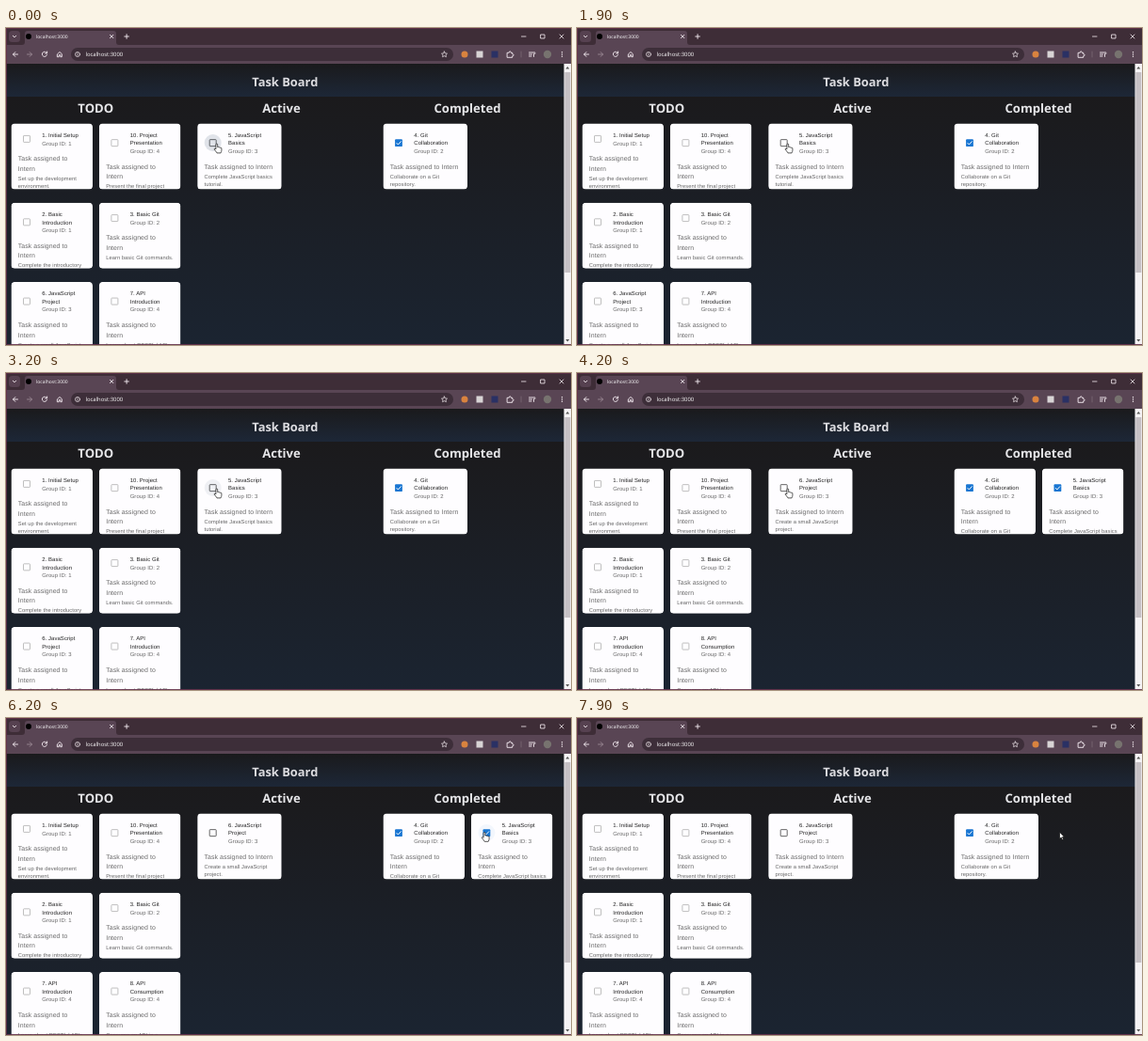
Write an HTML page that moves like this. It is 600 by 337 pixels and loops after 8000 ms.

```html
<!DOCTYPE html>
<html lang="en">
<head>
<meta charset="utf-8">
<title>Task Board</title>
<style>
  html, body { margin: 0; width: 100%; height: 100%; overflow: hidden; background: #1b1b1d; }
  svg { display: block; width: 600px; height: 337px; text-rendering: geometricPrecision; }
  .ui { font-family: "Open Sans", "Noto Sans", sans-serif; fill: #fff; }
  .head { font-family: "Open Sans", "Noto Sans", sans-serif; font-weight: 700; fill: #dcdce0; text-anchor: middle; }
  .card { font-family: "Liberation Sans", Arial, sans-serif; font-size: 5.95px; letter-spacing: .01em; }
  .title { fill: #222; }
  .group { fill: #666; }
  .task { fill: #6a6a6a; font-size: 6.95px; }
  .desc { fill: #666; font-size: 5.75px; letter-spacing: .01em; }
  .line { fill: none; stroke: #f6eef3; stroke-width: .9; stroke-linecap: round; stroke-linejoin: round; }
</style>
</head>
<body>
<svg viewBox="0 0 600 337">
  <defs>
    <linearGradient id="banner" x2="0" y2="1">
      <stop stop-color="#1a1a1c"/><stop offset="1" stop-color="#1d2737"/>
    </linearGradient>
    <linearGradient id="page" x2="0" y2="1">
      <stop stop-color="#1b1a1c"/><stop offset="1" stop-color="#1b2431"/>
    </linearGradient>
  </defs>

  <!-- browser window -->
  <rect width="600" height="19" fill="#3e2d37"/>
  <rect x="3" y="3" width="12" height="12" rx="3.5" fill="#564150"/>
  <path d="M17 18q3 0 3-3V6q0-3 3-3h91q3 0 3 3v9q0 3 3 3z" fill="#594554"/>
  <rect y="18" width="600" height="20" fill="#594554"/>
  <rect x="69" y="21" width="406" height="14" rx="7" fill="#3d2e39"/>
  <circle cx="24" cy="9" r="3" fill="#000"/>
  <g class="ui">
    <text x="32" y="11" font-size="5">localhost:3000</text>
    <text x="84.5" y="30.1" font-size="5.9">localhost:3000</text>
  </g>
  <g class="line">
    <path d="M7.3 8.2 9 9.9l1.7-1.7M110.5 7.3l3.4 3.4m0-3.4-3.4 3.4M125.8 9h4.6m-2.3-2.3v4.6"/>
    <path d="M547.5 9h4.5m16-2h4v4h-4zM588 7l4 4m0-4-4 4" stroke-width=".8"/>
    <path d="M12.5 28H7.5m2.3-2.4L7.5 28l2.3 2.4"/>
    <path d="M22.5 28h5m-2.3-2.4 2.3 2.4-2.3 2.4" stroke="#9a8894"/>
    <path d="M43.3 26.6a2.6 2.6 0 1 0 .2 2M43.6 25v2h-2"/>
    <path d="M54.7 27.6 57 25.5l2.3 2.1v3.1h-1.5v-2h-1.6v2h-1.5z"/>
    <circle cx="76" cy="28" r="2.5" stroke-width=".7"/><path d="M76 27.8v1.3m0-2.5v.1" stroke-width=".7"/>
    <path d="m465.5 25 .9 1.9 2.1.3-1.5 1.4.4 2.1-1.9-1-1.9 1 .4-2.1-1.5-1.4 2.1-.3z" stroke-width=".7"/>
    <path d="M532.5 26.3h1.7q0-1.5 1-1.5t1 1.5h1.5v1.5q1.4 0 1.4 1t-1.4 1v1.5h-5.2z"/>
    <path d="M547 25v6" stroke="#806d7a" stroke-width=".7"/>
    <path d="M555.5 26h6m-6 2h3m-3 2h2.5m2.5.4v-3l1.6-.4"/>
  </g>
  <circle cx="487" cy="28" r="3.5" fill="#d9833f"/>
  <rect x="499.5" y="24.5" width="7" height="7" fill="#d8d4d5"/>
  <rect x="515.5" y="24.5" width="7" height="7" fill="#2a3164"/>
  <circle cx="575" cy="28" r="4.2" fill="#77736f"/>
  <g fill="#f6eef3"><circle cx="590.5" cy="25.8" r=".7"/><circle cx="590.5" cy="28" r=".7"/><circle cx="590.5" cy="30.2" r=".7"/></g>

  <!-- page -->
  <rect y="38" width="593" height="35" fill="url(#banner)"/>
  <rect y="73" width="593" height="264" fill="url(#page)"/>
  <g class="head">
    <text x="296.3" y="61.6" font-size="12.9">Task Board</text>
    <g font-size="13.1" fill="#e6e6e9">
      <text x="95.3" y="89.5">TODO</text>
      <text x="292.5" y="89.5">Active</text>
      <text x="490" y="89.5">Completed</text>
    </g>
  </g>
  <g id="board" class="card"></g>
  <circle id="ripple" cy="122" r="9"/>

  <rect x="592.5" y="38" width="7.5" height="299" fill="#f5f3f5"/>
  <rect x="593.3" y="47" width="6" height="213" fill="#c6c1c5"/>
  <path d="M594.3 43.5l2-2.4 2 2.4zM594.3 331l2 2.4 2-2.4z" fill="#555"/>
  <path d="M.5 0V336.5H600M0 .4H600" fill="none" stroke="#65324b" stroke-width=".9"/>

  <g id="cursor" fill="#fff" stroke="#111" stroke-width=".7" stroke-linejoin="round">
    <path id="arrow" d="M0 0V7.2L1.7 5.7 2.8 8.3 4 7.8 2.9 5.3H5.1z"/>
    <path id="hand" d="M-.9.6Q-.9-.2 0-.2T.9.6V3.4Q1.8 2.8 2.4 3.6 3.3 3.1 3.9 4 5 3.7 5.1 4.8V7Q5 8.2 4.2 9.6H.2Q-.6 8-2.6 5.9-2.8 4.7-1.7 4.9L-.9 5.6z"/>
  </g>
</svg>

<script>
const LOOP = 8000, ADVANCE = 3450, REMOVE = 7450;
const $ = id => document.getElementById(id);

// id: [title lines, description lines]
const tasks = {
  1: ["1. Initial Setup", "Set up the development|environment."],
  2: ["2. Basic|Introduction", "Complete the introductory"],
  3: ["3. Basic Git", "Learn basic Git commands."],
  4: ["4. Git|Collaboration", "Collaborate on a Git|repository."],
  5: ["5. JavaScript|Basics", "Complete JavaScript basics|tutorial."],
  6: ["6. JavaScript|Project", "Create a small JavaScript|project."],
  7: ["7. API|Introduction", "Learn about RESTful APIs"],
  8: ["8. API|Consumption", "Consume an API in a"],
  10: ["10. Project|Presentation", "Present the final project"]
};
const groups = { 1: 1, 2: 1, 3: 2, 4: 2, 5: 3, 6: 3, 7: 4, 8: 4, 10: 4 };

function checkbox(x, y, kind) {
  if (kind == "done")
    return `<rect x="${x - 3.9}" y="${y - 3.9}" width="7.8" height="7.8" rx=".9" fill="#1976d2"/>
      <path d="M${x - 2.3} ${y}l1.7 1.8 3.2-3.5" fill="none" stroke="#fff" stroke-width="1"/>`;
  return `<rect x="${x - 3.5}" y="${y - 3.5}" width="7" height="7" rx=".6" fill="none"
    stroke="${kind == "active" ? "#555" : "#b8b8b8"}" stroke-width=".9"/>`;
}

function card(id, x, y, kind, wide) {
  const [title, desc] = tasks[id].map(s => s.split("|"));
  const extra = (title.length - 1) * 8.5, clip = `clip${id}`;
  const box = `<rect x="${x}" y="${y}" width="${wide ? 89.5 : 86.5}" height="70" rx="3.5" fill="#fefdff"/>`;
  const lines = (cls, list, dx, top, gap) => list.map((s, i) =>
    `<text class="${cls}" x="${x + dx}" y="${top + i * gap}">${s}</text>`).join("");
  const task = wide ? ["Task assigned to Intern"] : ["Task assigned to", "Intern"];
  const taskTop = y + 39.7 + extra, descTop = taskTop + task.length * 10.4 - .4;
  return `<clipPath id="${clip}">${box}</clipPath><g clip-path="url(#${clip})">${box}
    ${checkbox(x + 16.5, y + 16.4 + extra / 2, kind)}
    ${lines("title", title, 32.8, y + 14.3, 8.5)}
    ${lines("group", ["Group ID: " + groups[id]], 32.8, y + 23 + extra, 0)}
    ${lines("task", task, 7.3, taskTop, 10.4)}
    ${lines("desc", desc, 7.3, descTop, 8.3)}</g>`;
}

function column(ids, x, kind) {
  const wide = ids.length == 1;
  return ids.map((id, i) => card(id, x + i % 2 * 93.4, 101.5 + (i >> 1) * 84.2, kind, wide)).join("");
}

const stages = [
  [[1, 10, 2, 3, 6, 7], [5], [4]],
  [[1, 10, 2, 3, 7, 8], [6], [4, 5]],
  [[1, 10, 2, 3, 7, 8], [6], [4]]
].map(([todo, active, done]) =>
  column(todo, 5.5, "todo") + column(active, 203.2, "active") + column(done, 400.5, "done"));

// time, x, y
const path = [[0, 223.8, 123.3], [4700, 223.8, 123.3], [5500, 407.5, 131], [6300, 512.5, 121.3], [LOOP, 512.5, 121.3]];
function pointer(t) {
  const i = path.findIndex(p => p[0] > t), a = path[i - 1], b = path[i];
  let k = (t - a[0]) / (b[0] - a[0]);
  k = k * k * (3 - 2 * k);
  return [a[1] + (b[1] - a[1]) * k, a[2] + (b[2] - a[2]) * k];
}

const clamp = v => Math.max(0, Math.min(1, v));
function ripple(t) {
  if (t < 2700) return [219.7, "#35526b", .15 * clamp(1 - t / 500)];
  if (t < 4700) return [219.7, "#35526b", .15 * clamp((t - 3100) / 200) * clamp((3900 - t) / 450)];
  if (t >= 6200 && t < REMOVE) return [510.4, "#1976d2", .05 + .12 * clamp((t - 6700) / 200)];
  return [0, "#000", 0];
}

let shown = -1;
function draw(now) {
  const t = Math.floor(now % LOOP / 100) * 100;
  const stage = t < ADVANCE ? 0 : t < REMOVE ? 1 : 2;
  if (stage != shown) $("board").innerHTML = stages[shown = stage];

  const [rx, color, alpha] = ripple(t);
  $("ripple").setAttribute("cx", rx);
  $("ripple").setAttribute("fill", color);
  $("ripple").setAttribute("opacity", alpha);

  const [x, y] = pointer(t);
  const onBox = x < 228 || (x > 505 && stage == 1);
  $("cursor").setAttribute("transform", `translate(${x} ${y})`);
  $("hand").style.display = onBox ? "" : "none";
  $("arrow").style.display = onBox ? "none" : "";
  requestAnimationFrame(draw);
}
draw(0);
</script>
</body>
</html>
```
